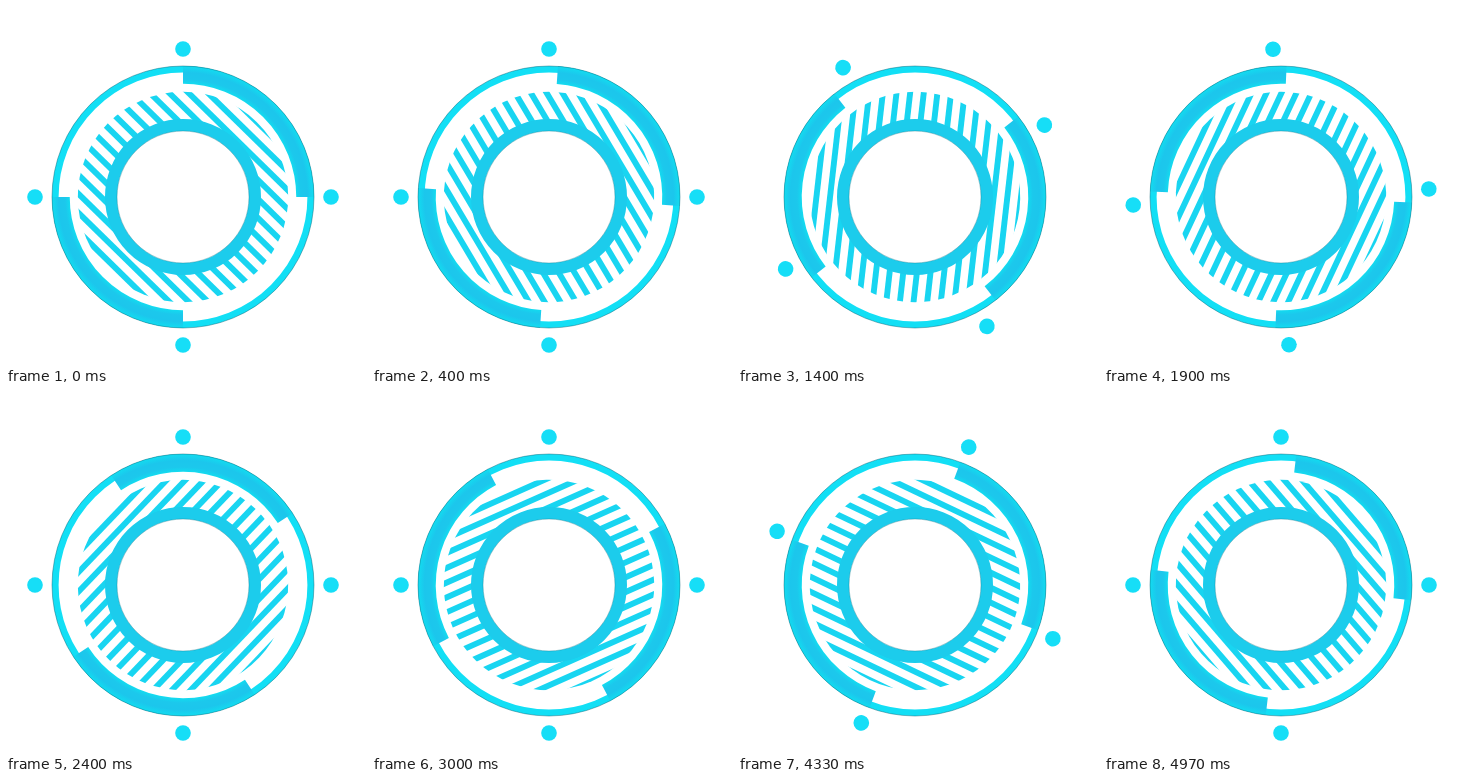
Write an HTML page that moves like this. It is 360x360 px and loops after 5000 ms.

```html
<!DOCTYPE html>
<html lang="en">
<head>
<meta charset="utf-8">
<title>Rotating rings</title>
<style>
  html, body { margin: 0; width: 100%; height: 100%; overflow: hidden; background: #fff; }
  svg { display: block; width: 100vw; height: 100vh; }
</style>
</head>
<body>
<svg viewBox="0 0 360 360">
  <defs>
    <radialGradient id="band" gradientUnits="userSpaceOnUse" cx="0" cy="0" r="131">
      <stop offset=".863" stop-color="#12dcf0"/>
      <stop offset=".9" stop-color="#1cc8ec"/>
      <stop offset=".95" stop-color="#1cc6ec"/>
      <stop offset="1" stop-color="#12dcf0"/>
    </radialGradient>
    <clipPath id="disc"><circle r="105.2"/></clipPath>
  </defs>
  <g transform="translate(177 191)" fill="none">
    <g id="stripes" clip-path="url(#disc)" stroke="#18d5f1" stroke-width="5.9"></g>
    <circle r="72" fill="#fff" stroke="#1cccec" stroke-width="12"/>
    <circle r="66" stroke="#0b6f80" stroke-opacity=".5" stroke-width=".7"/>
    <circle r="127.7" stroke="#12dff5" stroke-width="6.6"/>
    <g id="arcs" stroke="url(#band)" stroke-width="17.7">
      <path d="M0-122.1A122.1 122.1 0 0 1 122.1 0"/>
      <path d="M0 122.1A122.1 122.1 0 0 1-122.1 0"/>
    </g>
    <circle r="131" stroke="#0b5f70" stroke-opacity=".55" stroke-width=".8"/>
    <g id="dots" fill="#16def7"></g>
  </g>
</svg>
<script>
const LOOP = 5;
const byId = id => document.getElementById(id);

function add(parent, tag, attrs) {
  const el = document.createElementNS('http://www.w3.org/2000/svg', tag);
  for (const key in attrs) el.setAttribute(key, attrs[key]);
  parent.append(el);
}

const stripes = byId('stripes'), arcs = byId('arcs'), dots = byId('dots');

for (let i = 0; i < 16; i++) {
  const y = 13.55 * i - 105.3;
  add(stripes, 'line', { x1: -110, x2: 110, y1: y, y2: y });
}
for (let i = 0; i < 4; i++) {
  add(dots, 'circle', { cx: 148, r: 7.8, transform: `rotate(${90 * i})` });
}

// Arc rotation: seconds, degrees, degrees per second
const ARC = [
  [0, 0, 0], [0.8, 16, 41], [1.4, 52, 74], [2.4, 146.7, 130],
  [3.6, 369, 236], [4.33, 560, 265], [5, 734, 252]
];

function arcAngle(t) {
  let i = 0;
  while (i < ARC.length - 2 && t >= ARC[i + 1][0]) i++;
  const [t0, a, va] = ARC[i], [t1, b, vb] = ARC[i + 1];
  const h = t1 - t0, u = (t - t0) / h, w = 1 - u;
  return w * w * ((1 + 2 * u) * a + u * h * va) + u * u * ((3 - 2 * u) * b - w * h * vb);
}

// Same curve as CSS ease-in-out
function easeInOut(x) {
  let lo = 0, hi = 1;
  for (let i = 0; i < 20; i++) {
    const s = (lo + hi) / 2;
    if (1.26 * s - 0.78 * s * s + 0.52 * s ** 3 < x) lo = s; else hi = s;
  }
  return lo * lo * (3 - 2 * lo);
}

// The dots rest, then make one full turn, every three seconds
function dotAngle(t) {
  const x = (t % 3 - 0.93) / 1.04;
  return x <= 0 || x >= 1 ? 0 : 360 * easeInOut(x);
}

const turn = (el, deg) => el.setAttribute('transform', `rotate(${deg.toFixed(3)})`);

function draw() {
  const t = performance.now() / 1000 % LOOP;
  turn(stripes, 44.4 + 37.2 * t);
  turn(arcs, arcAngle(t));
  turn(dots, dotAngle(t));
  requestAnimationFrame(draw);
}
draw();
</script>
</body>
</html>
```
